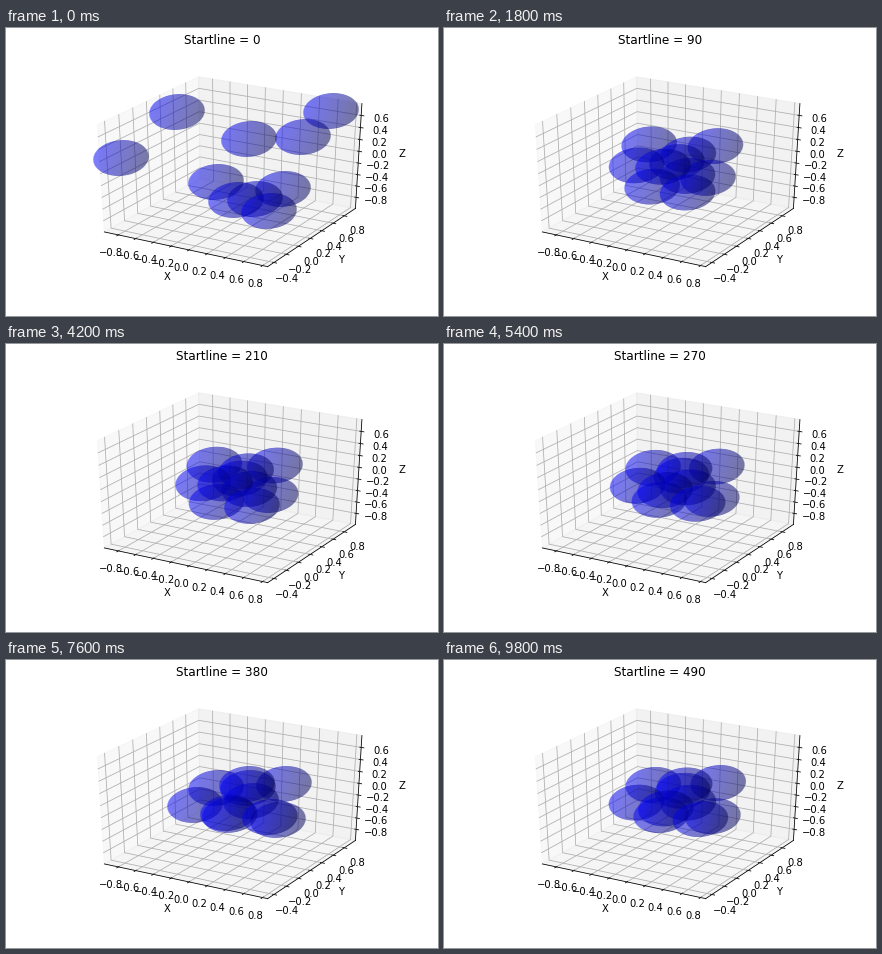
Write a matplotlib script that moves like this. It is 432x288 px and loops after 10 s.

```python
import matplotlib.pyplot as plt
import numpy as np
from matplotlib.animation import FuncAnimation
from matplotlib.patches import Polygon

W, H = 432, 288
FRAMES, INTERVAL = 50, 200

# axis limits and perspective view
LOW = np.array([-0.926, -0.469, -0.962])
HIGH = np.array([0.818, 0.975, 0.758])
SPAN = HIGH - LOW
ELEV, AZIM, DIST = np.radians(30), np.radians(-60), 10
RIGHT = np.array([-np.sin(AZIM), np.cos(AZIM), 0])
UP = np.array([-np.sin(ELEV) * np.cos(AZIM), -np.sin(ELEV) * np.sin(AZIM), np.cos(ELEV)])
NEAR = np.cross(RIGHT, UP)
CENTER = np.array([225.9, 140.34])
SCALE = np.array([181.0, 117.5])
E = 0.5 + 1 / 48  # the panes reach a little past the limits

# spheres: scattered start, first cluster, later cluster
RADIUS, ALPHA = 0.253, 0.3
LIGHT = np.array([-1, -1, 0.5]) / 1.5
GATHERED, SWING = 14, 50
START = np.array([(325, 83), (171, 84), (297, 109), (243, 111), (115, 130),
                  (277, 161), (249, 171), (210, 154), (230, 172), (263, 183)])
EARLY = np.array([(267, 121), (208, 119), (240, 128), (232, 136), (199, 138),
                  (263, 149), (243, 146), (208, 159), (218, 136), (242, 163)])
LATE = np.array([(278, 124), (210, 128), (241, 124), (242, 128), (189, 145),
                 (272, 160), (245, 141), (222, 153), (224, 155), (264, 157)])

fig = plt.figure(figsize=(W / 72, H / 72), dpi=72, facecolor="white")
ax = fig.add_axes([0, 0, 1, 1])
ax.set_xlim(0, W)
ax.set_ylim(H, 0)
ax.axis("off")


def project(p):
    """Stage position of a point in the unit cube centred on the origin."""
    p = np.asarray(p, float)
    flat = np.array([p @ RIGHT, -(p @ UP)])
    return CENTER + SCALE * flat * DIST / (DIST - p @ NEAR)


def line(points, color, width):
    x, y = np.array([project(p) for p in points]).T
    ax.plot(x, y, color=color, lw=width, solid_capstyle="projecting",
            solid_joinstyle="round", zorder=2)


def pane(axis, side, gray):
    color = (gray, gray, gray, 0.5)
    square = [(-E, -E), (E, -E), (E, E), (-E, E)]
    corners = [project(np.insert(c, axis, side)) for c in square]
    ax.add_patch(Polygon(corners, facecolor=color, edgecolor=color, lw=1, zorder=1))


def put(point, axis, value):
    p = np.array(point, float)
    p[axis] = value
    return p


def draw_axis(axis, edge, tick_dir, grid, ticks, name):
    """Axis line, grid, ticks and labels; edge is a corner on the axis line."""
    away = put(np.sign(edge), axis, 0)
    step = put(np.zeros(3), tick_dir, away[tick_dir] / 12)
    line([put(edge, axis, -E), put(edge, axis, E)], "black", 0.8)
    for value in ticks:
        t = (value - LOW[axis]) / SPAN[axis] - 0.5
        line([put(p, axis, t) for p in grid], "#b0b0b0", 0.8)
    for value in ticks:
        t = (value - LOW[axis]) / SPAN[axis] - 0.5
        base = put(edge, axis, t)
        line([base - 0.1 * step, base + 0.2 * step], "black", 0.8)
        text = f"{value:.1f}".replace("-", "\u2212")
        ax.text(*project(base + away / 12), text, fontsize=10,
                ha="center", va="top", zorder=2)
    ax.text(*project(put(edge, axis, 0) + away * 2.173 / 12), name, fontsize=10,
            ha="center", va="center", zorder=2)


pane(0, -E, 0.95)
pane(1, E, 0.90)
pane(2, -E, 0.925)
draw_axis(0, (-E, -E, -E), 1, [(0, -E, -E), (0, E, -E), (0, E, E)],
          np.arange(-4, 5) / 5, "X")
draw_axis(1, (E, E, -E), 0, [(-E, 0, E), (-E, 0, -E), (E, 0, -E)],
          np.arange(-2, 5) / 5, "Y")
draw_axis(2, (E, E, -E), 0, [(E, E, 0), (-E, E, 0), (-E, -E, 0)],
          np.arange(-4, 4) / 5, "Z")

title = fig.text(0.5, 0.98, "", fontsize=12, ha="center", va="top")
layer = ax.imshow(np.zeros((H, W, 4)), extent=(0, W, H, 0), aspect="auto",
                  interpolation="nearest", zorder=3)

# screen offset of a surface normal, and the way back
JAC = RADIUS * np.array([SCALE[0] * RIGHT / SPAN, -SCALE[1] * UP / SPAN])
BACK = JAC.T @ np.linalg.inv(JAC @ JAC.T)
DEPTH = np.cross(JAC[0], JAC[1])
DEPTH *= np.sign(DEPTH @ NEAR) / np.linalg.norm(DEPTH)


def sphere(canvas, through, center):
    """Blend the far and near half of a shaded sphere into the canvas."""
    x0, y0 = np.floor(center).astype(int) - (34, 24)
    ys, xs = np.mgrid[y0:y0 + 49, x0:x0 + 69]
    offset = np.stack([xs + 0.5 - center[0], ys + 0.5 - center[1]], axis=-1)
    normal = offset @ BACK.T
    size = np.linalg.norm(normal, axis=-1)
    cover = np.clip((1 - size) * 22 + 0.5, 0, 1)
    bulge = np.sqrt(np.clip(1 - size ** 2, 0, 1)) * (DEPTH @ LIGHT)
    area = np.s_[y0:y0 + 49, x0:x0 + 69]
    for side in (-1, 1):
        blue = np.clip(0.65 + 0.35 * (normal @ LIGHT + side * bulge), 0.3, 1)
        a = ALPHA * cover
        canvas[area] = canvas[area] * (1 - a) + blue * a
        through[area] *= 1 - a


def positions(t):
    """Fall together with an ease-out, then swing between the two clusters."""
    if t < GATHERED:
        return EARLY + (START - EARLY) * (1 - t / GATHERED) ** 2.5
    mix = (1 - np.cos(2 * np.pi * (t - GATHERED) / SWING)) / 2
    return EARLY + (LATE - EARLY) * mix


def update(i):
    canvas, through = np.zeros((H, W)), np.ones((H, W))
    for center in positions(i):
        sphere(canvas, through, center)
    opacity = 1 - through
    rgba = np.zeros((H, W, 4))
    rgba[..., 2] = np.clip(canvas / np.maximum(opacity, 1e-6), 0, 1)
    rgba[..., 3] = opacity
    layer.set_data(rgba)
    title.set_text(f"Startline = {10 * i}")
    return layer, title


anim = FuncAnimation(fig, update, frames=FRAMES, interval=INTERVAL,
                     repeat=True, repeat_delay=0, blit=False)
plt.show()
```
